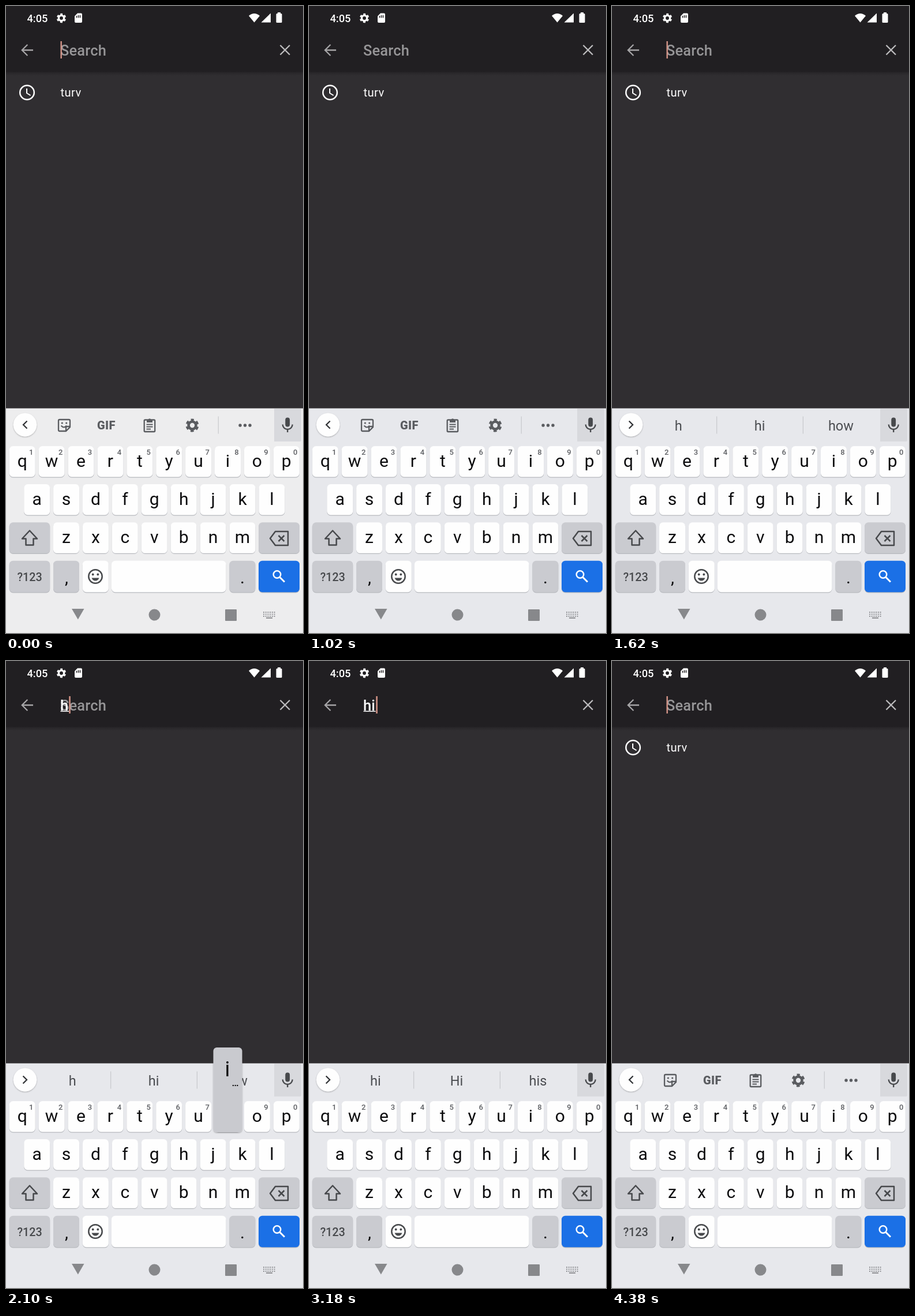
An HTML page for the animation above (4440 ms loop, 515 by 1087 pixels).

```html
<!DOCTYPE html>
<html lang="en">
<head>
<meta charset="utf-8">
<title>Search keyboard</title>
<style>
  html, body { margin: 0; width: 100%; height: 100%; overflow: hidden; background: #302e31; }
  svg { display: block; width: 100vw; height: 100vh; font-family: Roboto, sans-serif; }
  .line { fill: none; stroke: currentColor; }
  .mid { text-anchor: middle; }
  .field { font-size: 25.4px; font-weight: 500; letter-spacing: .2px; }
  .word { font-size: 23.5px; fill: #4b4d51; text-anchor: middle; }
  .letter { font-size: 30px; fill: #0b0b0d; text-anchor: middle; }
  .digit { font-size: 13px; font-weight: 500; fill: #5d5f63; text-anchor: middle; }

  .show { opacity: 0; animation: 4.44s step-end infinite; }
  .recent { animation-name: recent; }
  .hint { animation-name: hint; }
  .first { animation-name: first; }
  .both { animation-name: both; }
  .tools { animation-name: tools; }
  .early { animation-name: early; }
  .late { animation-name: late; }
  .press-h { animation-name: press-h; }
  .press-i { animation-name: press-i; }
  .caret { animation-name: blink, advance; }
  .board { fill: #e7e8ec; animation: settle 4.44s linear infinite; }

  @keyframes recent { 0% { opacity: 1 } 41.89% { opacity: 0 } 82.43% { opacity: 1 } }
  @keyframes hint { 0% { opacity: 1 } 48.64% { opacity: 0 } 82.43% { opacity: 1 } }
  @keyframes first { 0% { opacity: 0 } 41.89% { opacity: 1 } 48.64% { opacity: 0 } }
  @keyframes both { 0% { opacity: 0 } 48.64% { opacity: 1 } 82.43% { opacity: 0 } }
  @keyframes tools { 0% { opacity: 1 } 32.43% { opacity: 0 } 85.13% { opacity: 1 } }
  @keyframes early { 0% { opacity: 0 } 32.43% { opacity: 1 } 51.35% { opacity: 0 } }
  @keyframes late { 0% { opacity: 0 } 51.35% { opacity: 1 } 85.13% { opacity: 0 } }
  @keyframes press-h { 0% { opacity: 0 } 28.37% { opacity: 1 } 32.43% { opacity: 0 } }
  @keyframes press-i { 0% { opacity: 0 } 44.59% { opacity: 1 } 50% { opacity: 0 } }
  @keyframes blink {
    0% { opacity: 1 } 13.51% { opacity: 0 } 28.37% { opacity: 1 } 54.05% { opacity: 0 }
    67.56% { opacity: 1 } 81.08% { opacity: 0 } 95.94% { opacity: 1 }
  }
  @keyframes advance {
    0% { transform: none } 41.89% { transform: translateX(14.5px) }
    48.64% { transform: translateX(21.5px) } 82.43% { transform: none }
  }
  @keyframes settle { 0%, 1.35% { fill: #ededee } 5.4%, 100% { fill: #e7e8ec } }
</style>
</head>
<body>
<svg viewBox="0 0 515 1087" preserveAspectRatio="none">
  <defs>
    <linearGradient id="shade" x2="0" y2="1">
      <stop stop-color="#1f1d20"/><stop offset=".35" stop-color="#29272a"/><stop offset="1" stop-color="#302e31"/>
    </linearGradient>
    <filter id="lift" x="-20%" y="-20%" width="140%" height="140%">
      <feDropShadow dx="0" dy="1" stdDeviation="1.3" flood-opacity=".3"/>
    </filter>
    <g id="gear" class="line">
      <circle r="5.6" stroke-width="4"/>
      <circle r="8.5" stroke-width="3" stroke-dasharray="4.8 4.1" stroke-dashoffset="2.4" transform="rotate(-90)"/>
    </g>
  </defs>

  <rect width="515" height="1087" fill="#302e31"/>
  <rect y="113" width="515" height="8" fill="url(#shade)"/>
  <rect width="515" height="113" fill="#211f22"/>

  <!-- status bar -->
  <g fill="#fff" color="#fff">
    <text x="36.5" y="28" font-size="18.2" font-weight="500">4:05</text>
    <use href="#gear" transform="translate(96 21) scale(.82)"/>
    <path d="M124 12.5h6q2 0 2 2v12.500q0 2-2 2h-9q-2 0-2-2V17.500z"/>
    <path d="M122.500 17v3.500M125.500 16v4.500M128.500 16v4.500" stroke="#211f22" stroke-width="1.500"/>
    <path d="M421 17Q430.500 9 440 17L430.500 28.500z"/>
    <path d="M459 12.500V28.500H442.500z"/>
    <path d="M471 11h5v2h1q1.500 0 1.500 1.500v13q0 1.500-1.500 1.500h-7q-1.500 0-1.500-1.500v-13q0-1.500 1.500-1.500h1z"/>
  </g>

  <!-- search field -->
  <path class="line" color="#a6a5a7" stroke-width="2.300" d="M47 76.500H28M37.300 67L27.800 76.500L37.300 86"/>
  <path class="line" color="#bdbcbe" stroke-width="2.300" d="M475.500 68l16.500 16.500M492 68l-16.500 16.500"/>
  <text class="field hint show" x="94" y="85.500" fill="#969597">Search</text>
  <g class="first show" fill="#fff">
    <text class="field" x="94" y="85.500">h</text><rect x="94.500" y="86.500" width="14.500" height="1.500"/>
  </g>
  <g class="both show" fill="#fff">
    <text class="field" x="94" y="85.500">hi</text><rect x="94.500" y="86.500" width="21" height="1.500"/>
  </g>
  <rect class="caret show" x="94.500" y="61" width="2.300" height="30" fill="#dc9a8c"/>

  <g class="recent show" color="#fff" fill="#fff">
    <circle class="line" cx="36.500" cy="150" r="12.300" stroke-width="2.500"/>
    <path class="line" stroke-width="2" d="M36 143v8l6.500 4"/>
    <text x="94.500" y="157" font-size="20.200" letter-spacing=".4">turv</text>
  </g>

  <!-- keyboard -->
  <rect class="board" y="697.500" width="515" height="389.500"/>
  <path d="M465 698h45q2 0 2 2v53q0 2-2 2h-45z" fill="#d8d9dd"/>
  <g color="#47494c">
    <rect x="484.300" y="713.500" width="7.800" height="16" rx="3.900" fill="currentColor"/>
    <path class="line" stroke-width="2.300" d="M479.700 725.500a8.500 8.500 0 0 0 17 0M488.200 734v5"/>
  </g>
  <circle cx="33" cy="726" r="20.200" fill="#fefefe" filter="url(#lift)"/>

  <g class="tools show" color="#5a5c60" fill="#5a5c60">
    <path class="line" color="#333538" stroke-width="2.300" d="M36.500 719.500l-6.500 6.500l6.500 6.500"/>
    <path class="line" stroke-width="2.300" d="M93 717h16q2 0 2 2v11l-7 7H93q-2 0-2-2v-16q0-2 2-2zM111 729h-5q-2 0-2 2v6"/>
    <circle cx="97.300" cy="723" r="1.600"/><circle cx="104.700" cy="723" r="1.600"/>
    <path class="line" stroke-width="2" d="M95.500 727.500q5 5.500 9.500 0"/>
    <text class="mid" x="174" y="733.500" font-size="20" font-weight="900" letter-spacing=".5">GIF</text>
    <rect class="line" x="239.700" y="717.500" width="18.500" height="20.500" rx="1.500" stroke-width="2.300"/>
    <path d="M244 717h2.500a2.700 2.700 0 0 1 5 0h2.500v5h-10z"/>
    <path class="line" stroke-width="2.100" d="M243.500 725.500h11M243.500 729.500h11M243.500 733.500h7.500"/>
    <use href="#gear" transform="translate(323 727) scale(1.150)"/>
    <rect x="367.700" y="711.500" width="1" height="30" fill="#c0c2c6"/>
    <circle cx="406" cy="727" r="2.700"/><circle cx="414.500" cy="727" r="2.700"/><circle cx="423" cy="727" r="2.700"/>
  </g>

  <g id="suggestions"></g>
  <g id="keys"></g>

  <g color="#47494c" stroke-width="2.500">
    <path class="line" stroke-linejoin="round" d="M41 909.500L54 923.500H47.500V934.500H34.500V923.500H28z"/>
    <path class="line" stroke-linejoin="round" d="M458 923L467 911H489V935H467z"/>
    <path class="line" d="M472.500 918l10 10M482.500 918l-10 10"/>
    <circle class="line" cx="155" cy="989" r="11.700"/>
    <g fill="currentColor"><circle cx="150.700" cy="985.500" r="1.900"/><circle cx="159.300" cy="985.500" r="1.900"/></g>
    <path d="M148.500 991.500h13q-2 5-6.500 5t-6.500-5z" fill="currentColor"/>
    <g color="#fff"><circle class="line" cx="470" cy="985.500" r="6.300"/><path class="line" stroke-width="3" d="M474.500 990l8.500 8.500"/></g>
  </g>

  <!-- navigation -->
  <g fill="#87888b">
    <path d="M114 1045h21.500l-10.700 18.500z"/>
    <circle cx="257.500" cy="1055.500" r="10"/>
    <rect x="380" y="1046" width="20" height="20" rx="1"/>
    <path class="line" color="#939498" stroke-width="2" stroke-dasharray="2 1.700" d="M446 1051h21M446 1054.500h21M446 1058h21"/>
    <path d="M451 1060h11v1.800h-11z"/>
  </g>
  <g id="popups"></g>
</svg>
<script>
  const SVG = 'http://www.w3.org/2000/svg';
  const pitch = 50.9;
  const layer = id => document.getElementById(id);

  function add(parent, tag, attrs, text = '') {
    const node = document.createElementNS(SVG, tag);
    for (const name in attrs) node.setAttribute(name, attrs[name]);
    node.textContent = text;
    return parent.appendChild(node);
  }

  const keys = layer('keys');
  function key(x, y, width = 45, fill = '#fefefe', height = 53.5) {
    add(keys, 'rect', { x, y: y + 1.2, width, height, rx: 6.5, fill: '#b7b9be' });
    add(keys, 'rect', { x, y, width, height, rx: 6.5, fill });
  }
  function label(x, y, text, style = 'letter') {
    add(keys, 'text', { x, y, class: style }, text);
  }

  const rows = [['qwertyuiop', 5.7, 763], ['asdfghjkl', 31.2, 829], ['zxcvbnm', 82, 895.3]];
  rows.forEach(([letters, left, top], row) => {
    [...letters].forEach((letter, i) => {
      const x = left + i * pitch;
      key(x, top);
      label(x + 22.5, top + 36, letter);
      if (row === 0) label(x + 38, top + 14.5, (i + 1) % 10, 'digit');
    });
  });

  const grey = '#cacbd0';
  key(5.7, 895.3, 70.5, grey);
  key(438, 895.3, 71, grey);
  [[5.7, 70.5, grey], [82, 45, grey], [132.8, 45], [183, 198.5], [387.4, 45, grey], [438, 71, '#1b70e6']]
    .forEach(([x, width, fill]) => key(x, 961.7, width, fill, 54.5));
  label(105, 1001, ',');
  label(410, 1001, '.');
  add(keys, 'text', { x: 41, y: 996.5, class: 'mid', 'font-size': 19.7, 'font-weight': 500, fill: '#47494c' }, '?123');

  function suggest(style, words) {
    const group = add(layer('suggestions'), 'g', { class: style + ' show' });
    add(group, 'path', { class: 'line', color: '#333538', 'stroke-width': 2.3, d: 'M29.5 719.5l6.500 6.500l-6.500 6.500' });
    words.forEach((word, i) => add(group, 'text', { x: 115.3 + i * 140.8, y: 735.7, class: 'word' }, word));
    [181.2, 330.8].forEach(x => add(group, 'rect', { x, y: 711.5, width: 1, height: 30, fill: '#c0c2c6' }));
  }
  suggest('early', ['h', 'hi', 'how']);
  suggest('late', ['hi', 'Hi', 'his']);

  function popup(letter, x, y, more) {
    const group = add(layer('popups'), 'g', { class: `press-${letter} show` });
    add(group, 'rect', { x: x - 25, y: y - 93, width: 50, height: 147, rx: 6, fill: '#c9cacf', filter: 'url(#lift)' });
    add(group, 'text', { x: x - .5, y: y - 43, class: 'letter', style: 'font-size:36px' }, letter);
    if (more) add(group, 'text', { x: x + 13, y: y - 26, class: 'mid', 'font-size': 17, 'font-weight': 500 }, '…');
  }
  popup('h', 307.7, 829, true);
  popup('i', 384.5, 763, true);
</script>
</body>
</html>
```
